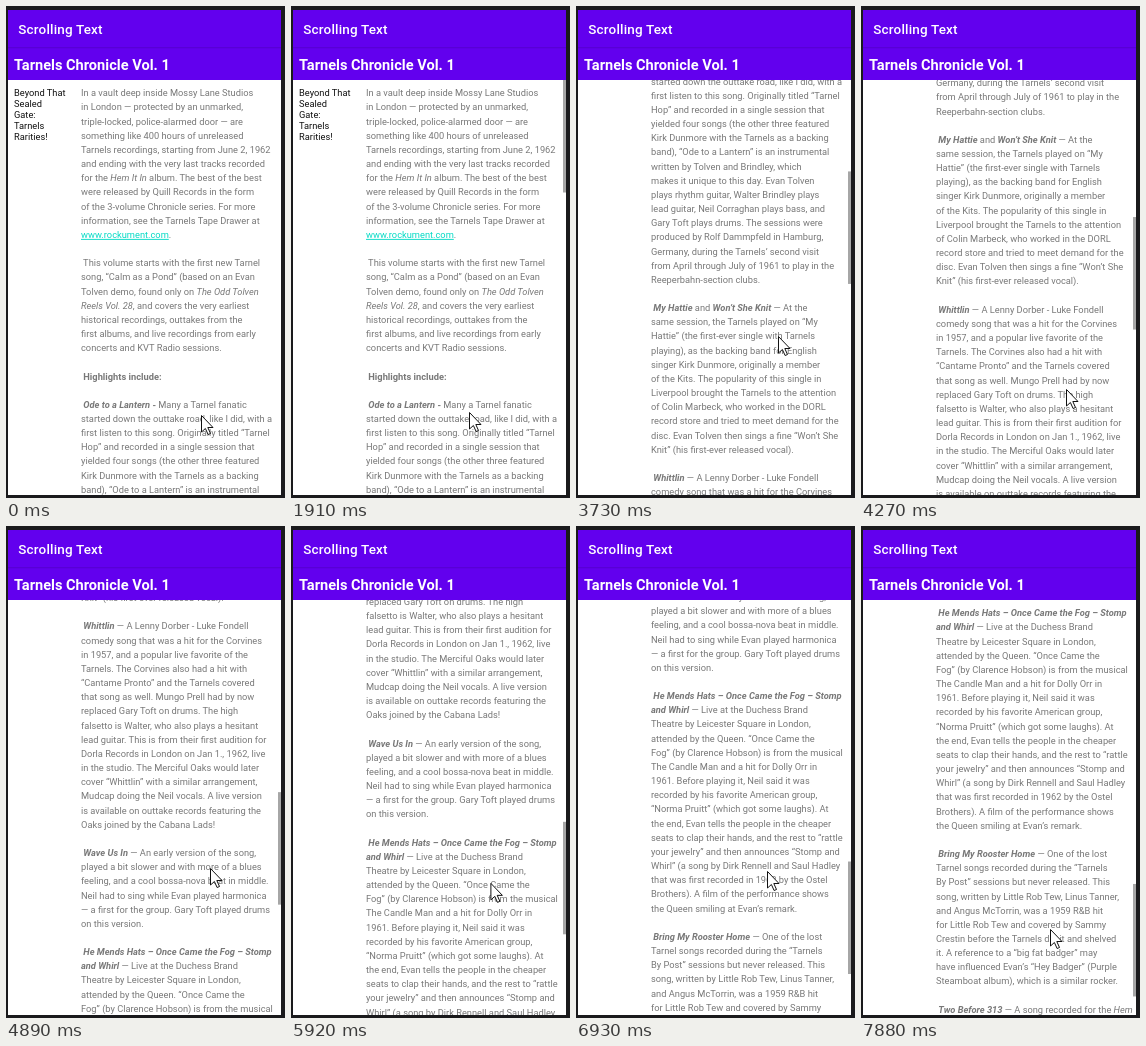
Animation of 279x492 px, one loop 8 s. Source, as an HTML page:

```html
<!DOCTYPE html>
<html lang="en">
<head>
<meta charset="utf-8">
<title>Scrolling Text</title>
<style>
  html, body { margin: 0; width: 100%; height: 100%; overflow: hidden; background: #1a1a1c; }
  svg { display: block; width: 279px; height: 492px; font-family: Roboto, sans-serif; }
  text { white-space: pre; }
  .copy { font-size: 9.29px; fill: #787878; }
  .side { fill: #111; }
  .em { font-style: italic; }
  .strong { font-weight: 700; }
  .song { font-weight: 700; font-style: italic; }
  .link { fill: #03dac5; text-decoration: underline; }
  .bar { font-size: 13.5px; font-weight: 500; letter-spacing: .0125em; fill: #fff; }
  .heading { font-size: 14.6px; font-weight: 700; fill: #fff; }
</style>
</head>
<body>
<svg viewBox="0 0 279 492">
  <defs>
    <clipPath id="view"><rect x="2" y="74" width="273" height="415"/></clipPath>
    <linearGradient id="shade" x2="0" y2="1">
      <stop stop-opacity=".14"/><stop offset="1" stop-opacity="0"/>
    </linearGradient>
  </defs>
  <rect width="279" height="492" fill="#1a1a1c"/>
  <rect x="2" y="4" width="273" height="485" fill="#fff"/>
  <g clip-path="url(#view)">
    <g id="page" class="copy"></g>
    <rect id="thumb" x="272" width="3" height="112.5" fill="#a6a6a6"/>
  </g>
  <rect x="2" y="4" width="273" height="70" fill="#6200ee"/>
  <rect x="2" y="41" width="273" height="2" fill="url(#shade)"/>
  <text class="bar" x="12.3" y="27.7">Scrolling Text</text>
  <text class="heading" x="8" y="63.6">Tarnels Chronicle Vol. 1</text>
  <path id="cursor" d="M0 0V16.5L3.9 13L6.6 19L9 18L6.3 12H11.5Z" fill="#fff" stroke="#111" stroke-linejoin="round"/>
</svg>
<script>
// Markup: *song title*, _emphasis_, ~strong~, [link]
const ARTICLE = `In a vault deep inside Mossy Lane Studios
in London — protected by an unmarked,
triple-locked, police-alarmed door — are
something like 400 hours of unreleased
Tarnels recordings, starting from June 2, 1962
and ending with the very last tracks recorded
for the _Hem It In_ album. The best of the best
were released by Quill Records in the form
of the 3-volume Chronicle series. For more
information, see the Tarnels Tape Drawer at
[www.rockument.com].

 This volume starts with the first new Tarnel
song, “Calm as a Pond” (based on an Evan
Tolven demo, found only on _The Odd Tolven_
_Reels Vol. 28_, and covers the very earliest
historical recordings, outtakes from the
first albums, and live recordings from early
concerts and KVT Radio sessions.

 ~Highlights include:~

 *Ode to a Lantern -* Many a Tarnel fanatic
started down the outtake road, like I did, with a
first listen to this song. Originally titled “Tarnel
Hop” and recorded in a single session that
yielded four songs (the other three featured
Kirk Dunmore with the Tarnels as a backing
band), “Ode to a Lantern” is an instrumental
written by Tolven and Brindley, which
makes it unique to this day. Evan Tolven
plays rhythm guitar, Walter Brindley plays
lead guitar, Neil Corraghan plays bass, and
Gary Toft plays drums. The sessions were
produced by Rolf Dammpfeld in Hamburg,
Germany, during the Tarnels’ second visit
from April through July of 1961 to play in the
Reeperbahn-section clubs.

 *My Hattie* and *Won’t She Knit* — At the
same session, the Tarnels played on “My
Hattie” (the first-ever single with Tarnels
playing), as the backing band for English
singer Kirk Dunmore, originally a member
of the Kits. The popularity of this single in
Liverpool brought the Tarnels to the attention
of Colin Marbeck, who worked in the DORL
record store and tried to meet demand for the
disc. Evan Tolven then sings a fine “Won’t She
Knit” (his first-ever released vocal).

 *Whittlin* — A Lenny Dorber - Luke Fondell
comedy song that was a hit for the Corvines
in 1957, and a popular live favorite of the
Tarnels. The Corvines also had a hit with
“Cantame Pronto” and the Tarnels covered
that song as well. Mungo Prell had by now
replaced Gary Toft on drums. The high
falsetto is Walter, who also plays a hesitant
lead guitar. This is from their first audition for
Dorla Records in London on Jan 1., 1962, live
in the studio. The Merciful Oaks would later
cover “Whittlin” with a similar arrangement,
Mudcap doing the Neil vocals. A live version
is available on outtake records featuring the
Oaks joined by the Cabana Lads!

 *Wave Us In* — An early version of the song,
played a bit slower and with more of a blues
feeling, and a cool bossa-nova beat in middle.
Neil had to sing while Evan played harmonica
— a first for the group. Gary Toft played drums
on this version.

 *He Mends Hats – Once Came the Fog – Stomp*
*and Whirl* — Live at the Duchess Brand
Theatre by Leicester Square in London,
attended by the Queen. “Once Came the
Fog” (by Clarence Hobson) is from the musical
The Candle Man and a hit for Dolly Orr in
1961. Before playing it, Neil said it was
recorded by his favorite American group,
“Norma Pruitt” (which got some laughs). At
the end, Evan tells the people in the cheaper
seats to clap their hands, and the rest to “rattle
your jewelry” and then announces “Stomp and
Whirl” (a song by Dirk Rennell and Saul Hadley
that was first recorded in 1962 by the Ostel
Brothers). A film of the performance shows
the Queen smiling at Evan’s remark.

 *Bring My Rooster Home* — One of the lost
Tarnel songs recorded during the “Tarnels
By Post” sessions but never released. This
song, written by Little Rob Tew, Linus Tanner,
and Angus McTorrin, was a 1959 R&amp;B hit
for Little Rob Tew and covered by Sammy
Crestin before the Tarnels did it and shelved
it. A reference to a “big fat badger” may
have influenced Evan’s “Hey Badger” (Purple
Steamboat album), which is a similar rocker.

 *Two Before 313* — A song recorded for the _Hem_
_It In_ album.`.split('\n');
const SIDE = ['Beyond That', 'Sealed', 'Gate:', 'Tarnels', 'Rarities!'];

const LOOP = 8000, TOP = 74, BASELINE = 90.3;
const BAR_SHOWS = 1370, BAR_RATIO = 0.271;

// [start, equal screen refreshes until the next start]
const REFRESH = [
  [0, 1], [250, 6], [1090, 1], [1370, 4], [1910, 2], [2180, 1], [2480, 5],
  [3180, 2], [3460, 1], [3580, 5], [4270, 2], [4530, 1], [4650, 2], [4890, 5],
  [5510, 1], [5780, 4], [6380, 3], [6780, 1], [6930, 1], [7360, 3], [7880, 1], [LOOP, 1]
];
const SCROLL = [
  [0, 0], [2180, 0], [2480, 14], [3180, 173.3], [4270, 505.7], [4890, 709],
  [5200, 778], [5510, 800], [6380, 859.5], [6930, 965], [7880, 1047.8]
];
const POINTER = [
  [0, 195, 409], [1090, 178, 261], [1910, 178, 406], [2180, 178, 406],
  [2760, 188, 310], [3180, 194, 361], [3720, 202, 330], [4270, 205, 383],
  [4890, 204, 342], [5510, 201, 350], [6380, 194, 380], [6930, 191, 345], [7880, 189, 403]
];

const $ = id => document.getElementById(id);
const span = name => `<tspan class="${name}">$1</tspan>`;
const smooth = u => u * u * (3 - 2 * u);

function markup(line) {
  return line
    .replace(/\*(.+?)\*/g, span('song'))
    .replace(/_(.+?)_/g, span('em'))
    .replace(/~(.+?)~/g, span('strong'))
    .replace(/\[(.+?)\]/g, span('link'));
}

function column(lines, x, pitch, name) {
  return lines.map((line, i) =>
    `<text class="${name}" x="${x}" y="${BASELINE + i * pitch}">${markup(line)}</text>`).join('');
}

function sample(keys, t, ease = u => u) {
  const i = keys.findIndex(key => key[0] > t);
  if (i < 0) return keys[keys.length - 1].slice(1);
  const a = keys[i - 1], b = keys[i];
  const u = ease((t - a[0]) / (b[0] - a[0]));
  return a.slice(1).map((v, k) => v + (b[k + 1] - v) * u);
}

// Time of the latest screen refresh
function refreshed(t) {
  const i = REFRESH.findIndex(([start]) => start > t);
  const [start, count] = REFRESH[i - 1];
  const step = (REFRESH[i][0] - start) / count;
  return start + Math.floor((t - start) / step) * step;
}

function draw(time) {
  const t = refreshed(time % LOOP);
  const [scroll] = sample(SCROLL, t);
  const [x, y] = sample(POINTER, t, smooth);
  $('page').setAttribute('transform', `translate(0 ${-scroll})`);
  $('thumb').setAttribute('y', TOP + scroll * BAR_RATIO);
  $('thumb').setAttribute('opacity', t >= BAR_SHOWS ? 1 : 0);
  $('cursor').setAttribute('transform', `translate(${x + .5} ${y + .5})`);
}

$('page').innerHTML = column(SIDE, 8, 10.9, 'side') + column(ARTICLE, 75, 14.16, '');

const begin = performance.now();
function tick() {
  draw(performance.now() - begin);
  requestAnimationFrame(tick);
}
tick();
</script>
</body>
</html>
```
